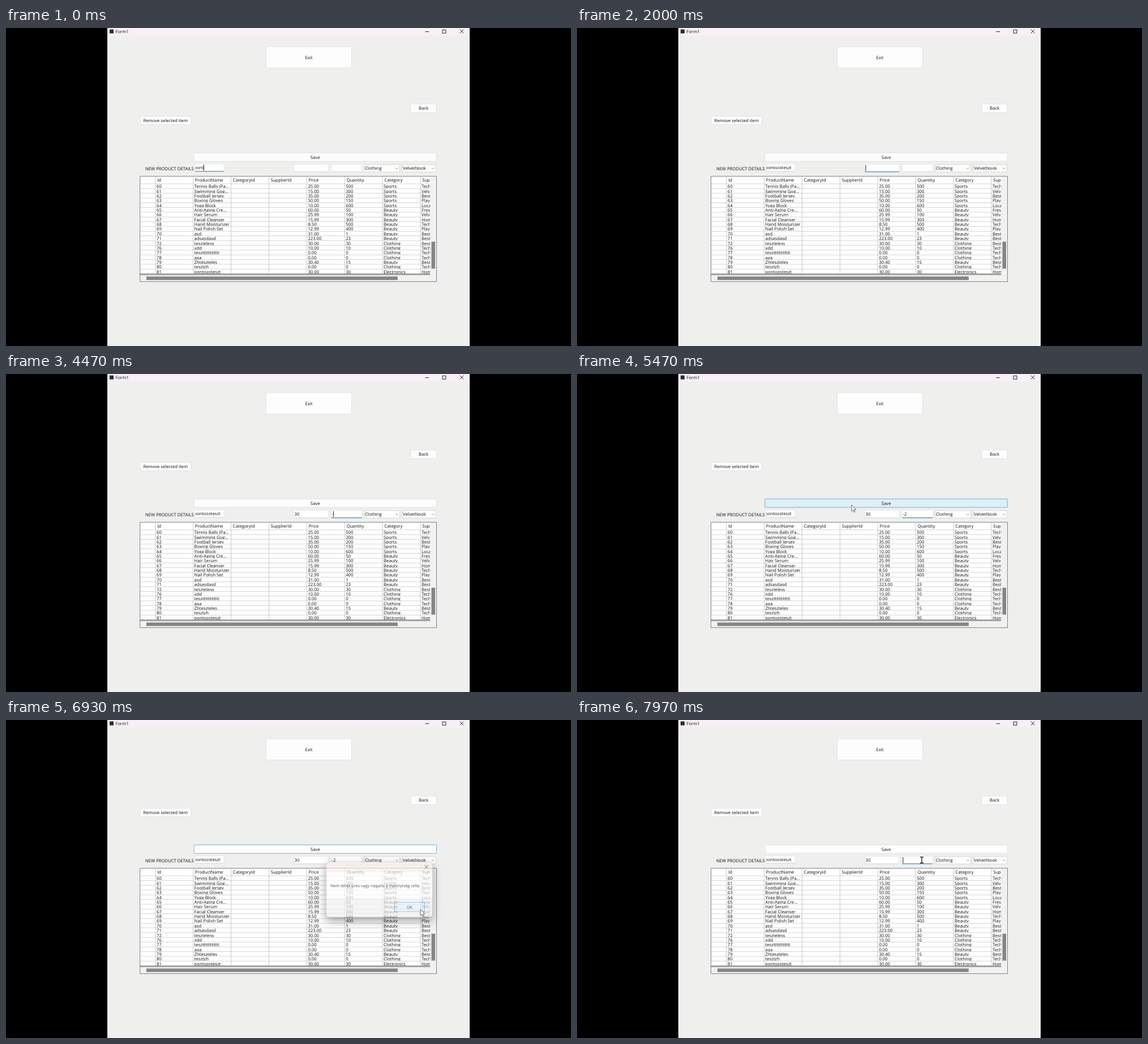
Write an HTML page that moves like this. It is 998 px wide and 561 px high and loops after 8 s.

```html
<!DOCTYPE html>
<html lang="en">
<head>
<meta charset="utf-8">
<title>Product form</title>
<style>
  html, body { margin: 0; width: 100%; height: 100%; overflow: hidden; background: #000; }
  svg { display: block; width: 100vw; height: 100vh; }
  text { font: 7.7px "Open Sans", "Noto Sans", sans-serif; fill: #111; text-rendering: geometricPrecision; white-space: pre; }
  #dialog { filter: drop-shadow(0 7px 8px rgba(0, 0, 0, .5)); transform-origin: 659.5px 299px; }
  #dialog text { font-size: 7.4px; }
</style>
</head>
<body>
<svg id="stage" viewBox="0 0 998 561"></svg>
<script>
const LOOP = 8000;
const BLUE = '#1479bd';
const stage = document.getElementById('stage');

function add(tag, attrs, parent = stage) {
  const node = document.createElementNS('http://www.w3.org/2000/svg', tag);
  for (const key in attrs) node.setAttribute(key, attrs[key]);
  return parent.appendChild(node);
}
const rect = (x, y, width, height, fill, extra, parent) =>
  add('rect', { x, y, width, height, fill, ...extra }, parent);
const path = (d, stroke, extra, parent) =>
  add('path', { d, stroke, fill: 'none', ...extra }, parent);
function text(value, x, y, extra, parent) {
  const node = add('text', { x, y, ...extra }, parent);
  node.textContent = value;
  return node;
}
function button(label, x, y, w, h, parent) {
  const face = rect(x, y, w, h, '#fdfdfd', { stroke: '#dedede', 'stroke-width': .8, rx: .6 }, parent);
  text(label, x + w / 2, y + h / 2 + 2.8, { 'text-anchor': 'middle' }, parent);
  return face;
}
const cross = (x, y, r, parent) =>
  path(`M${x - r} ${y - r}l${2 * r} ${2 * r}m0 ${-2 * r}l${-2 * r} ${2 * r}`, '#222', { 'stroke-width': .9 }, parent);

// Window
rect(179, 0, 640, 561, '#efefee');
const titleBar = rect(179, 0, 640, 13, '#f8f0f4');
rect(183, 2.5, 7, 7, '#2b2b33');
const titleItems = add('g');
text('Form1', 193.5, 9.2, {}, titleItems);
path('M740.5 6.5h6.5M771 3.2h6v6h-6z', '#222', { 'stroke-width': 1 }, titleItems);
cross(805, 6, 3.4, titleItems);

button('Exit', 459.5, 33, 151, 37.5);
button('Back', 715, 134, 45, 15.3);
button('Remove selected item', 237, 155.8, 89.5, 14.8);
const save = button('Save', 332, 220.3, 428.3, 15);

// Input row
function textBox(x, y, right, textX) {
  rect(x, y, right - x, 13, '#fefefe', { stroke: '#e6e6e6', 'stroke-width': .7 });
  const line = rect(x, y + 12.4, right - x, 1, '#d8d8d8');
  const mark = rect(textX, y + 1.7, 8, 10, '#0078d7');
  const value = text('', textX, y + 9.4);
  const caret = rect(0, y + 1.2, .9, 10.5, '#111');
  return { line, mark, value, caret, textX };
}
const boxes = {
  name: textBox(331.5, 240, 385, 332.2),
  price: textBox(508.5, 240.8, 569, 509.5),
  amount: textBox(574.5, 240.8, 628.5, 575.5)
};
rect(245, 239.5, 89.2, 15, '#efefee');
text('NEW PRODUCT DETAILS', 246, 250.6);

function combo(label, x, right) {
  rect(x, 241, right - x, 13, '#fdfdfc', { stroke: '#cfcfca', 'stroke-width': .8 });
  text(label, x + 1, 250.1);
  path(`M${right - 7.5} 246.5l2.2 2.2 2.2-2.2`, '#777', { 'stroke-width': .8 });
}
combo('Clothing', 633, 695.5);
combo('VelvetNook', 700, 759.5);

// Product table
const columns = [264, 330.6, 397.6, 464.5, 531.4, 598.2, 665.1, 732];
const heads = ['Id', 'ProductName', 'CategoryId', 'SupplierId', 'Price', 'Quantity', 'Category', 'Sup'];
const products = `60|Tennis Balls (Pa...|25.00|500|Sports|Tech
61|Swimming Gog...|15.00|300|Sports|Velv
62|Football Jersey|35.00|200|Sports|Best
63|Boxing Gloves|50.00|150|Sports|Play
64|Yoga Block|10.00|600|Sports|Loca
65|Anti-Aging Cre...|60.00|50|Beauty|Fres
66|Hair Serum|25.99|100|Beauty|Velv
67|Facial Cleanser|15.99|300|Beauty|Hom
68|Hand Moisturizer|8.50|500|Beauty|Tech
69|Nail Polish Set|12.99|400|Beauty|Play
70|asd|31.00|1|Beauty|Best
71|adsasdasd|223.00|23|Beauty|Best
72|teszteless|30.00|30|Clothing|Best
76|xdd|10.00|10|Clothing|Tech
77|teszttttttttttt|0.00|0|Clothing|Tech
78|aaa|0.00|0|Clothing|Tech
79|Zhteszteles|30.40|15|Beauty|Best
80|tesztzh|0.00|0|Clothing|Tech
81|pontozoteszt|30.00|30|Electronics|Hom`.split('\n').map(row => row.split('|'));
const cellColumns = [0, 1, 4, 5, 6, 7];
const rowHeight = 8.35;

rect(237, 262, 523, 185, '#fefefe');
heads.forEach((head, i) => text(head, columns[i] + 3.2, 271.2));
// Each row's fill trims the descenders of the row above.
products.forEach((cells, i) => {
  const y = 275 + i * rowHeight;
  rect(237, y - .7, 512, rowHeight, '#fefefe');
  rect(237, y - .4, 512, .7, '#c6c6c8');
  cells.forEach((cell, k) => text(cell, columns[cellColumns[k]] + 2, y + 7.3));
});
path(columns.map(x => `M${x} 262V433`).join(''), '#bebec4', { 'stroke-width': .8 });
rect(749.3, 262, 11, 185, '#f1f1f0');
rect(237, 433, 512.3, 3, '#a2a2a2');
rect(237, 436, 523, 11.3, '#f1f1f0');
rect(248, 438.4, 443.8, 6.2, '#858585');
rect(751.5, 377, 6.5, 47.5, '#858585');
rect(236.7, 261.6, 523.8, 185.8, 'none', { stroke: '#77777f', 'stroke-width': .9 });

// Message box
const dialog = add('g', { id: 'dialog' });
rect(564, 249.7, 191, 98.8, '#f2f2f2', { rx: 5 }, dialog);
path('M564 268V254.7a5 5 0 0 1 5-5H750a5 5 0 0 1 5 5V268z', 'none', { fill: '#faeeed' }, dialog);
rect(564, 268, 191, 47, '#fefefe', {}, dialog);
rect(564, 249.7, 191, 98.8, 'none', { rx: 5, stroke: '#a9a9a9', 'stroke-width': .6 }, dialog);
cross(744, 258.5, 3.2, dialog);
text('Nem lehet üres vagy negatív a mennyiség cella', 571.5, 294.6, {}, dialog);
const ok = button('OK', 686.6, 321.8, 54, 17, dialog);
ok.setAttribute('stroke', '#4f9fd6');

// Pointers
const arrow = path('M0 0V11.2L2.6 8.8 4.4 12.8 6.1 12 4.4 8.2H8z', '#444', { fill: '#fff', 'stroke-width': .8 });
const beam = path('M-3-5.2h2.2L0-4.5.8-5.2H3M0-4.5V4.5M-3 5.2h2.2L0 4.5.8 5.2H3', '#000', { 'stroke-width': 1.2 });

// Timeline: [start, value]
const steps = {
  focus: [[0, 'name'], [1900, 'price'], [3650, 'amount'], [5640, 'save'], [7560, 'amount']],
  price: [[0, ''], [2450, '3'], [2650, '30']],
  amount: [[0, ''], [4200, '-'], [4600, '-2'], [7800, '']]
};
const word = 'pontozoteszt';
steps.name = [...word.slice(3)].map((_, i) => [i * 150, word.slice(0, 4 + i)]);
const current = (list, t) => list.findLast(step => step[0] <= t);

const DIALOG_OPEN = 5720, DIALOG_CLOSE = 6870;
const track = [
  [4850, 360, 247], [5380, 485, 231], [5560, 485, 231], [5870, 494, 234],
  [6050, 494, 234], [6650, 732, 334], [6980, 732, 334], [7480, 609, 247]
];
const clamp = v => Math.min(1, Math.max(0, v));
const smooth = v => v * v * (3 - 2 * v);

function pointerAt(t) {
  const i = track.findLastIndex(p => p[0] <= t);
  const a = track[Math.max(i, 0)], b = track[i + 1] || a;
  const k = b === a ? 0 : smooth(clamp((t - a[0]) / (b[0] - a[0])));
  return [a[1] + (b[1] - a[1]) * k, a[2] + (b[2] - a[2]) * k];
}
const show = (node, on) => node.setAttribute('visibility', on ? 'visible' : 'hidden');

function render(t) {
  const [focusStart, focus] = current(steps.focus, t);
  for (const key in boxes) {
    const box = boxes[key];
    const [typed, value] = current(steps[key], t);
    const focused = focus === key;
    const selected = key === 'amount' && t >= 7620 && t < 7800;
    if (box.value.textContent !== value) box.value.textContent = value;
    box.value.style.fill = selected ? '#fff' : '#111';
    box.line.setAttribute('fill', focused ? BLUE : '#d8d8d8');
    show(box.mark, selected);
    const blink = (t - Math.max(typed, focusStart)) % 1060 < 530;
    show(box.caret, focused && blink && !selected);
    box.caret.setAttribute('x', box.textX + (value ? box.value.getComputedTextLength() : 0));
  }

  const hover = t >= 5300 && t < DIALOG_OPEN;
  save.setAttribute('fill', hover ? '#dfeef7' : '#fdfdfd');
  save.setAttribute('stroke', hover || focus === 'save' ? '#5aa5c6' : '#dedede');

  const modal = t >= DIALOG_OPEN && t < DIALOG_CLOSE;
  titleBar.setAttribute('fill', modal ? '#f1f0f1' : '#f8f0f4');
  titleItems.setAttribute('opacity', modal ? .55 : 1);

  const opened = clamp((t - DIALOG_OPEN) / 140);
  const closed = clamp((t - DIALOG_CLOSE) / 150);
  show(dialog, opened > 0 && closed < 1);
  dialog.style.opacity = opened * (1 - closed * .8);
  dialog.style.transform = `scale(${.94 + .06 * smooth(opened) - .04 * closed})`;
  ok.setAttribute('fill', t >= 6560 ? '#dfeef7' : '#fdfdfd');

  const [x, y] = pointerAt(t);
  const overText = t >= 7450;
  show(arrow, t >= 4850 && !overText);
  show(beam, overText);
  for (const node of [arrow, beam]) node.setAttribute('transform', `translate(${x} ${y})`);
}

const start = performance.now();
function tick() {
  render((performance.now() - start) % LOOP);
  requestAnimationFrame(tick);
}
tick();
</script>
</body>
</html>
```
